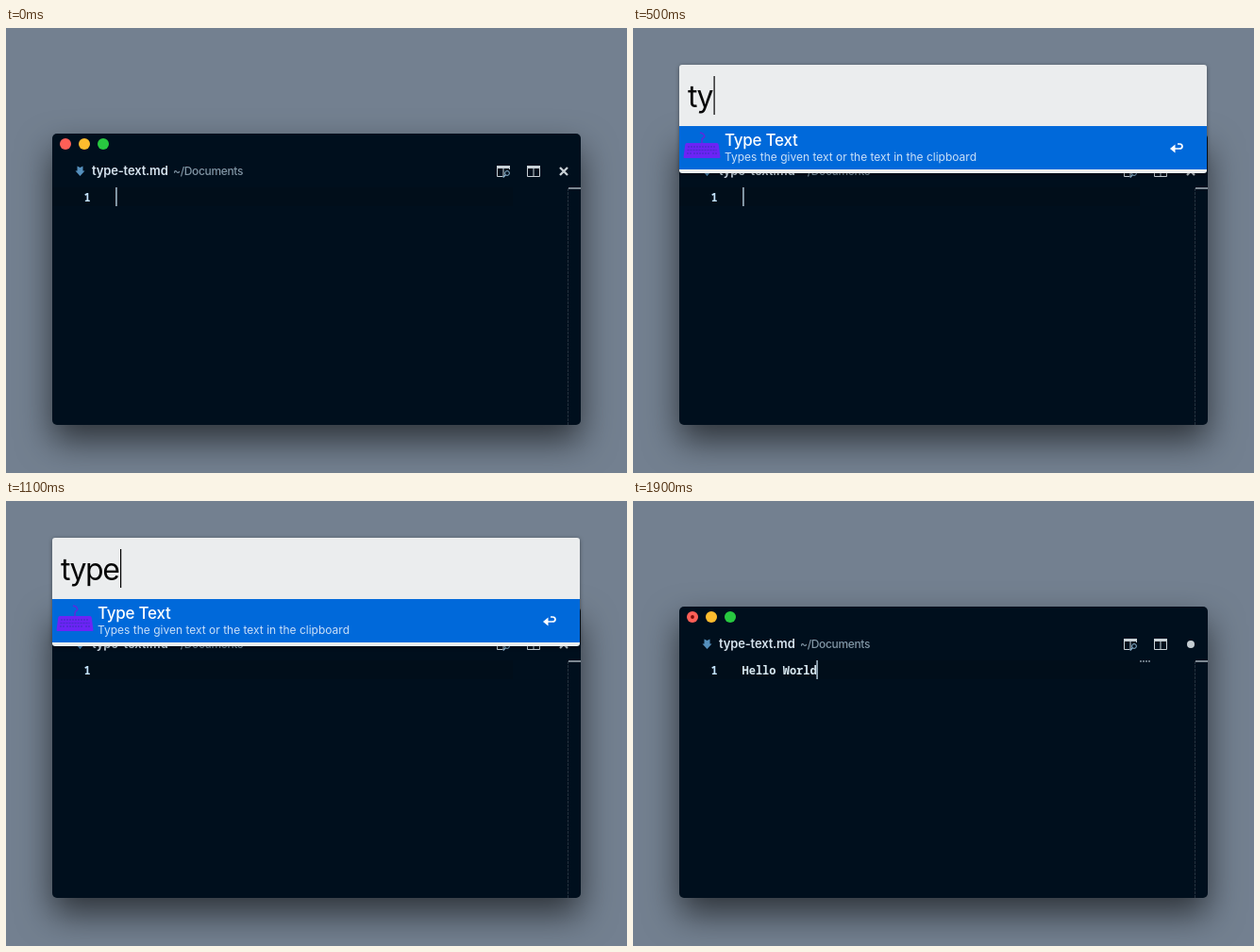
Write an HTML page that moves like this. It is 658 px wide and 472 px high and loops after 2 s.

```html
<!DOCTYPE html>
<html lang="en">
<head>
<meta charset="utf-8">
<title>Type Text</title>
<style>
  html, body { margin: 0; width: 100%; height: 100%; overflow: hidden; background: #738090; }
  svg { display: block; width: 658px; height: 472px; }
  text { font-family: Inter, "Liberation Sans", sans-serif; white-space: pre; }
  filter { color-interpolation-filters: sRGB; }
  .mono { font: 600 12px "Noto Sans Mono", "DejaVu Sans Mono", monospace; }
  .line { fill: none; stroke: #c9d1d6; }
</style>
</head>
<body>
<svg viewBox="0 0 658 472">
  <defs>
    <filter id="windowShadow" x="-20%" y="-30%" width="140%" height="170%">
      <feDropShadow dx="0" dy="17" stdDeviation="18" flood-color="#000" flood-opacity=".6"/>
    </filter>
    <filter id="panelShadow" x="-5%" y="-20%" width="110%" height="150%">
      <feDropShadow dx="0" dy="1" stdDeviation="2" flood-color="#000" flood-opacity=".42"/>
    </filter>
  </defs>

  <rect width="658" height="472" fill="#738090"/>

  <g id="editor">
    <rect x="49" y="112" width="560" height="309" rx="5" fill="#000f1d" filter="url(#windowShadow)"/>
    <rect x="49" y="169" width="488" height="20" fill="#010e1a"/>
    <circle cx="63" cy="123" r="6" fill="#ff5f57"/>
    <circle cx="83" cy="123" r="6" fill="#febc2e"/>
    <circle cx="103" cy="123" r="6" fill="#28c840"/>

    <path d="M75.500 146.500l3 1.500 3-1.500v5h2l-5 5.500-5-5.500h2z" fill="#5590bd"/>
    <text x="91" y="156" font-size="13" font-weight="600" letter-spacing="-.15" fill="#d6e3ee">type-text.md</text>
    <text x="177" y="156" font-size="12" font-weight="500" letter-spacing="-.35" fill="#8296a5">~/Documents</text>

    <g class="line">
      <path d="M533.500 150v-3h-13v10.500h6M527 147v10"/>
      <path d="M520 147.500h14" stroke-width="3"/>
      <circle cx="531" cy="154" r="2.400" stroke="#8fb8d4"/>
      <path d="M529.300 155.800l-2.600 2.700" stroke="#8fb8d4" stroke-width="1.300"/>
      <path d="M552.500 147v10.500h13v-10.500M559 147v10"/>
      <path d="M552 147.500h14" stroke-width="3"/>
      <path id="closeMark" d="M587 148l8 8m0-8l-8 8" stroke-width="2.300"/>
    </g>

    <path d="M595.500 170v251" stroke="#25323e" stroke-dasharray="3 1"/>
    <path d="M596 170h13" stroke="#7c8791" stroke-width="2"/>

    <text class="mono" x="82.500" y="184" fill="#c5e4fd">1</text>
    <text class="mono" id="typed" x="115.500" y="184" fill="#d6e6ee"></text>
    <rect id="editorCaret" y="169" width="1.800" height="20" fill="#8fa4b2"/>

    <g id="unsaved">
      <circle cx="63" cy="123" r="1.900" fill="#7d0b08"/>
      <circle cx="591" cy="152" r="4" fill="#c5cdd2"/>
      <path d="M537 170h11" stroke="#8795a0" stroke-width="1.500" stroke-dasharray="2 1"/>
    </g>
  </g>

  <g id="launcher">
    <rect id="panel" x="49" y="39" width="559" rx="3" fill="#ebedee" filter="url(#panelShadow)"/>
    <text id="query" x="58" y="84" font-size="32" font-weight="400" letter-spacing="-1.500" fill="#080808"></text>
    <rect id="queryCaret" y="51" width="1.200" height="41" fill="#000"/>
    <g id="result">
      <rect x="49" y="104" width="559" height="46" fill="#0069da"/>
      <path d="M73 122v-3q0-2 2-3t-1-4l-3-1" fill="none" stroke="#5b2bdc" stroke-width="1.500"/>
      <path d="M57 122h32q1.500 0 1.800 2l1.700 13q0 1-1 1h-37q-1 0-1-1l1.700-13q.3-2 1.800-2z" fill="#6c24f5"/>
      <path d="M58 126h30M57.500 129.500h31M57 133h5m2 0h18m2 0h5" stroke="#4c2bd0" stroke-width="1.500" stroke-dasharray="2 1"/>
      <text x="97" y="125" font-size="17" font-weight="500" letter-spacing="-.25" fill="#fff">Type Text</text>
      <text x="97" y="141" font-size="12" fill="#c9e0f8">Types the given text or the text in the clipboard</text>
      <path d="M574 128h5q3 0 3-2.500t-3-2.500h-2" fill="none" stroke="#fff" stroke-width="1.700"/>
      <path d="M569 128l5.500-4.500v9z" fill="#fff"/>
    </g>
  </g>
</svg>

<script>
const LOOP = 2000, STEP = 100;
const QUERY = "type", MESSAGE = "Hello World";
const QUERY_CARET = [59, 68, 85.5, 103, 121];
const CHAR_WIDTH = 7.2;

const el = id => document.getElementById(id);
const show = (id, on) => el(id).setAttribute("display", on ? "inline" : "none");
const within = (t, from, to) => t >= from && t < to;

function queryLength(t) {
  if (t < 500) return 0;
  return Math.min(QUERY.length, 2 + (t - 500) / STEP);
}

function messageLength(t) {
  if (t < 1300) return 0;
  return Math.min(MESSAGE.length, 5 + 6 * (t - 1300) / STEP);
}

function render(time) {
  const t = Math.floor((time % LOOP) / STEP) * STEP;

  const letters = queryLength(t);
  show("launcher", within(t, 400, 1200));
  show("result", letters > 0);
  el("panel").setAttribute("height", letters > 0 ? 115 : 65);
  el("query").textContent = QUERY.slice(0, letters);
  el("queryCaret").setAttribute("x", QUERY_CARET[letters]);

  const typed = messageLength(t);
  el("typed").textContent = MESSAGE.slice(0, typed);
  el("editorCaret").setAttribute("x", 116 + typed * CHAR_WIDTH - (typed ? 1 : 0));
  show("editorCaret", !within(t, 700, 1200) && !within(t, 1700, 1900));
  show("unsaved", typed > 0);
  show("closeMark", typed === 0);
}

const start = performance.now();
function tick() {
  render(performance.now() - start);
  requestAnimationFrame(tick);
}
tick();
</script>
</body>
</html>
```
